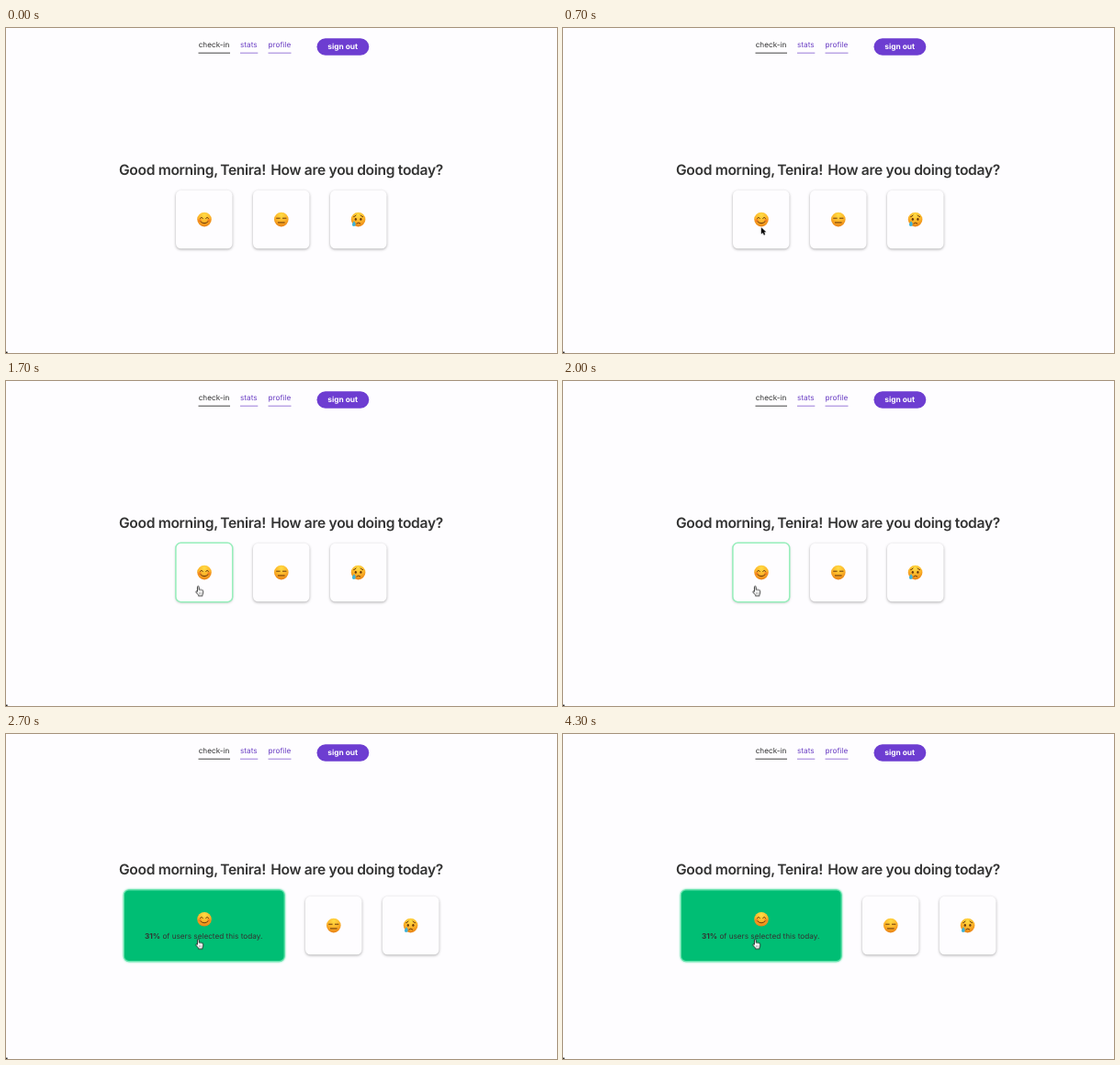
Recreate the animation shown at these times as an HTML page. Size 600 px wide and 354 px high, loop 4.4 s.

```html
<!DOCTYPE html>
<html lang="en">
<head>
<meta charset="utf-8">
<title>Daily check-in</title>
<style>
  html, body { margin: 0; width: 100%; height: 100%; overflow: hidden; background: #fefdff; }
  svg { display: block; width: 600px; height: 354px; }
  text { font: 400 8.2px Inter, sans-serif; fill: #333; text-rendering: geometricPrecision; white-space: pre; }
  .title { font-weight: 600; font-size: 15.6px; letter-spacing: -.31px; }
  .link { fill: #6b3fc4; }
  .strong { font-weight: 700; }
  .card { fill: #fefdff; filter: drop-shadow(0 1.4px 1.8px rgba(0, 0, 0, .32)); }
  .ring { fill: none; stroke: #96efbb; stroke-width: 1.5; }
  .chosen { fill: #00be74; stroke: #62e2ab; stroke-width: 1.2; filter: drop-shadow(0 0 1.2px #4ee0a0); }
  .ink { fill: none; stroke: #6a3a0c; stroke-width: 1; stroke-linecap: round; }
  .cursor { stroke-linejoin: round; }
</style>
</head>
<body>
<svg viewBox="0 0 600 354">
  <defs>
    <radialGradient id="skin" cx=".5" cy=".2" r=".85">
      <stop offset="0" stop-color="#ffdc45"/>
      <stop offset=".5" stop-color="#fdb62a"/>
      <stop offset="1" stop-color="#e67a12"/>
    </radialGradient>
    <rect id="tile" width="61.5" height="63.5" rx="5.5"/>
    <circle id="head" r="7.8" fill="url(#skin)"/>
    <g id="happy">
      <use href="#head"/>
      <circle cx="-5" cy="1.2" r="1.8" fill="#f26a22" opacity=".6"/>
      <circle cx="5" cy="1.2" r="1.8" fill="#f26a22" opacity=".6"/>
      <path class="ink" d="M-4.6-1.3q1.5-2.2 3 0M1.6-1.3q1.5-2.2 3 0M-4 2.3q4 3.8 8 0"/>
    </g>
    <g id="flat">
      <use href="#head"/>
      <path class="ink" d="M-5.2-1.4h3.6M1.6-1.4h3.6M-3.4 3.3h6.8"/>
    </g>
    <g id="sad">
      <use href="#head"/>
      <path class="ink" d="M-5-2.9q1.6-.4 2.5-1.7M5-2.9q-1.6-.4-2.5-1.7M-1.8 4.4q2-2.2 4 0"/>
      <ellipse cx="-2.8" cy="-.4" rx="1.1" ry="1.5" fill="#6a3a0c"/>
      <ellipse cx="2.8" cy="-.4" rx="1.1" ry="1.5" fill="#6a3a0c"/>
      <path d="M-4.6 1.6q2 2.6 1.7 3.9a1.9 1.9 0 0 1-3.8-.1q.2-1.5 2.1-3.8z" fill="#3fb2d8"/>
    </g>
  </defs>

  <rect width="600" height="354" fill="#fefdff"/>
  <rect y="352.6" width="1.6" height="1.4" fill="#222"/>

  <text x="209.7" y="21">check-in</text>
  <text class="link" x="255" y="21">stats</text>
  <text class="link" x="285.6" y="21">profile</text>
  <path d="M209.5 27.2h34.5" stroke="#444"/>
  <path d="M255 27.2h19.3M285.5 27.2h25" stroke="#9a7bd8"/>
  <rect x="338.5" y="11.2" width="56.8" height="18.6" rx="9.3" fill="#6d3dd1"/>
  <text class="strong" x="350.2" y="23.4" style="font-size:8.4px;fill:#fff">sign out</text>

  <g id="title">
    <text class="title" y="160"><tspan x="122.9">Good morning, </tspan><tspan x="233.2">Tenira!</tspan><tspan x="288.2">How are you doing today?</tspan></text>
  </g>

  <g id="asking">
    <use class="card" href="#tile" x="185" y="176.8"/>
    <rect id="ring" class="ring" x="184.9" y="176.3" width="61.8" height="64.4" rx="5.5"/>
    <use href="#happy" x="216" y="208.6"/>
  </g>
  <g id="answered">
    <rect class="chosen" x="128.4" y="169.8" width="174.8" height="77.8" rx="5.5"/>
    <use href="#happy" x="216" y="201.7"/>
    <text x="151" y="222.6"><tspan class="strong">31%</tspan> of users selected this today.</text>
  </g>
  <g id="others">
    <use class="card" href="#tile" x="269" y="176.8"/>
    <use href="#flat" x="299.8" y="208.6"/>
    <use class="card" href="#tile" x="353" y="176.8"/>
    <use href="#sad" x="383.6" y="208.6"/>
  </g>

  <g id="arrow" class="cursor">
    <path transform="scale(.88)" d="M0 0V8.6L2 6.8L3.4 9.9L5 9.2L3.7 6.2H6.3Z" fill="#000" stroke="#fff" stroke-width=".8" paint-order="stroke"/>
  </g>
  <g id="hand" class="cursor">
    <g transform="scale(.92)" stroke="#111">
      <path d="M1.7 6.8V1.2a.95.95 0 0 1 1.9 0V4.4q.9-.7 1.7.2q1-.5 1.7.3q1.4-.3 1.5 1.1V8q0 1.5-.9 2.5V11.7H3V10.6L.1 7.5q-.6-1.2.5-1.4q.6 0 1.1.7Z" fill="#fff" stroke-width=".9"/>
      <path d="M3.9 7.5v2M5.3 7.5v2M6.7 7.5v2" stroke-width=".4"/>
    </g>
  </g>
</svg>
<script>
  const LOOP = 4400, HOVER = 1500, ANSWER = 2100;

  // Each step is [start in ms, style]; it holds until the next one.
  function play(id, steps) {
    const hold = 'steps(1, end)';
    const frames = steps.map(([at, style]) => ({ offset: at / LOOP, easing: hold, ...style }));
    frames.push({ ...frames[frames.length - 1], offset: 1 });
    document.getElementById(id).animate(frames, { duration: LOOP, iterations: Infinity });
  }
  const move = (x, y) => ({ transform: `translate(${x}px, ${y}px)` });
  const show = opacity => ({ opacity });
  const at = (x, y, opacity = 1) => ({ ...move(x, y), ...show(opacity) });

  play('title', [[0, move(0, 0)], [ANSWER, move(0, -7)]]);
  play('others', [[0, move(0, 0)], [ANSWER, move(57, 0)]]);
  play('asking', [[0, show(1)], [ANSWER, show(0)]]);
  play('answered', [[0, show(0)], [ANSWER, show(1)]]);
  play('ring', [[0, show(0)], [HOVER, show(.5)], [HOVER + 100, show(1)]]);

  play('arrow', [
    [0, at(222, 320, 0)], [100, at(222, 320)], [200, at(215, 284)], [300, at(212, 257)],
    [400, at(211.7, 243)], [500, at(213.5, 228)], [600, at(215.3, 218)], [700, at(215.7, 217)],
    [HOVER, at(215.7, 217, 0)]
  ]);
  play('hand', [
    [0, at(211, 221, 0)], [HOVER, at(210, 222)], [HOVER + 100, at(208, 223)], [HOVER + 200, at(206.8, 223.3)]
  ]);
</script>
</body>
</html>
```
